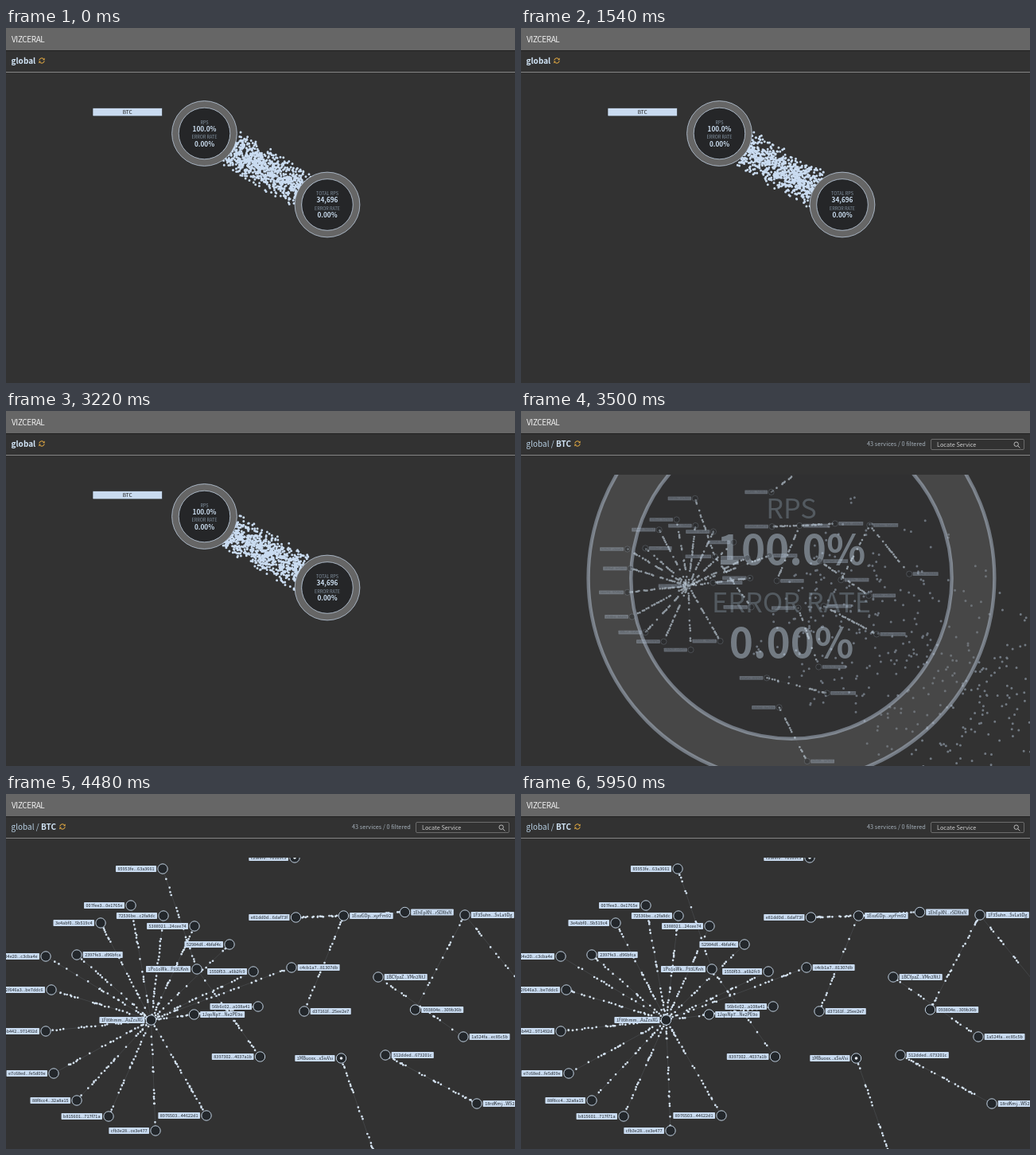
An HTML page with a canvas for the animation above (6020 ms loop, 640 by 446 pixels).

```html
<!DOCTYPE html>
<html lang="en">
<head>
<meta charset="utf-8">
<title>Traffic graph</title>
<style>
  html, body { margin: 0; width: 640px; height: 446px; overflow: hidden; background: #323232; }
  body {
    position: relative;
    font-family: "Noto Sans CJK JP", "Noto Sans CJK SC", "Noto Sans CJK", "Open Sans", sans-serif;
  }
  canvas { position: absolute; left: 0; top: 0; width: 640px; height: 446px; }
  header {
    position: absolute; left: 0; top: 0; width: 633px; height: 28px; padding-left: 7px;
    background: #666; border-bottom: 1px solid #1f1f1f;
    font-size: 10px; font-weight: 300; line-height: 27px; letter-spacing: -.4px; color: #f2f2f2;
  }
  nav {
    position: absolute; left: 0; top: 29px; width: 640px; height: 26px;
    border-bottom: 1px solid #858585; white-space: pre;
  }
  .crumb {
    position: absolute; left: 6.5px; top: -1px; height: 25px;
    display: flex; align-items: center; font-size: 10px; line-height: 24px; color: #b7cfe3;
  }
  .crumb b { color: #d3e6f8; }
  .crumb svg { margin: 1px 0 0 4px; }
  .count, .search { position: absolute; font-size: 7.35px; }
  .count { left: 435px; top: 6px; line-height: 12px; color: #a5b0ba; }
  .search {
    left: 515px; top: 6px; width: 109px; height: 12px; padding-left: 7px; line-height: 11px;
    border: 1px solid #6c6c6c; border-radius: 2px; color: #ccc;
  }
  .search svg { position: absolute; right: 4.5px; top: 1.5px; }
  .inside .top, .outside .deep { display: none; }
</style>
</head>
<body class="outside">
<canvas id="scene"></canvas>
<header>VIZCERAL</header>
<nav>
  <div class="crumb"><b class="top">global</b><span class="deep">global / <b>BTC</b></span><svg
    width="8" height="8" viewBox="0 0 8 8" fill="none" stroke="#efb243" stroke-width="1">
    <path d="M.8 3.6A3.2 3.2 0 0 1 6.6 2.2M7.2 4.4A3.2 3.2 0 0 1 1.4 5.8"/>
    <path d="M7.6.6V3.2H5ZM.4 7.4V4.8H3Z" fill="#efb243" stroke="none"/></svg></div>
  <span class="count deep">43 services / 0 filtered</span>
  <div class="search deep">Locate Service<svg width="9" height="9" viewBox="0 0 9 9"
    fill="none" stroke="#bbb" stroke-width="1"><circle cx="3.7" cy="3.7" r="2.7"/><path d="M5.7 5.7 8.4 8.4"/></svg></div>
</nav>
<script>
const LOOP = 6020, STEP = 70, ZOOM_AT = 3250, ZOOM_TIME = 1000;
const BLUE = '#c9dbf0', TAU = Math.PI * 2;
const FONT = getComputedStyle(document.body).fontFamily;
const canvas = document.getElementById('scene');
const ctx = canvas.getContext('2d');
const dpr = window.devicePixelRatio || 1;
canvas.width = 640 * dpr;
canvas.height = 446 * dpr;

let seed = 7;
function rnd() {
  seed = (seed + 0x6D2B79F5) | 0;
  let r = Math.imul(seed ^ (seed >>> 15), 1 | seed);
  r = (r + Math.imul(r ^ (r >>> 7), 61 | r)) ^ r;
  return ((r ^ (r >>> 14)) >>> 0) / 4294967296;
}
const mix = (a, b, k) => a + (b - a) * k;

// Outer view: one region fed by the total
const region = { x: 249.5, y: 132.5, title: 'RPS', value: '100.0%' };
const total = { x: 404, y: 222, title: 'TOTAL RPS', value: '34,696' };
const stream = Array.from({ length: 1350 }, () => ({
  phase: rnd(), speed: 0.25 + rnd() * 0.3, side: (rnd() + rnd() - 1) * 26
}));

// Inner view: x, y, label, label on the left, lit core
const nodes = [
  [182.5, 284, '1F89hmm...AsZcvXG', 1], [197, 94, '85953fe...63a3661', 1],
  [157, 140, '007fee3...0e1765e', 1], [198, 153, '72536be...c2fa8dc', 1],
  [119, 162, '3e4abf0...5b519c4', 1], [237, 166, '5388921...24cee74', 1],
  [281, 189, '52984df...4bfaf4c', 1], [89, 202, '2397fe3...d96bfca', 0],
  [50, 204, '4c94e20...c3cba4e', 1], [57, 246, '2f646a3...be7ddc6', 1],
  [50, 298, '2dbb442...971492d', 1], [60, 351, 'e7c68ed...fe5d09e', 1],
  [89, 385, '88f8cc4...32a8a15', 1], [129, 405, 'b815601...717f71a', 1],
  [188, 423, 'cfb3e28...ce3e477', 1], [252, 404, '8976503...44622d1', 1],
  [319.5, 330, '8397302...4037a1b', 1], [236.5, 277, '1JqoNp7...Ne2PE9o', 0],
  [317, 267, '56b6c02...a108a41', 1], [311, 223, '1550f53...a6b2fc9', 1],
  [240, 220, '1Po1oWk...F93LKnh', 1], [359, 218, 'c4cb1a7...81307db', 0],
  [375, 273, 'd37161f...25ee2e7', 0], [364.5, 155, 'e81dd0d...6daf73f', 1],
  [424.5, 153, '1EozGDp...xyrFm92', 0], [501.5, 148.5, '1EhEpXN...rSDXfxN', 0],
  [577, 152, '1F3Suhn...SvLa9Dg', 0], [468, 230, '1BCYpzZ...VMn2NfJ', 0],
  [514.5, 271, '093804e...309b36b', 0], [575, 305, '1a524fa...ec85c5b', 0],
  [477, 328, '512dded...673201c', 0], [592, 389, '18rdKmj...WS2MHxt', 0],
  [421.5, 332, '1MBuoxx...xSivVsi', 1, 1], [363, 80, 'c2af8f0...7d105c3', 1, 1],
  [466, 460, '4e02b7d...92c1f6a', 0], [430, 30, 'a71c3e9...05d84bb', 0],
  [663, 258, '1Kt7fQw...mZ8hRcE', 0], [353, 484, 'd90a41c...f6327e8', 1, 1],
  [484, 517, '1Gn4xPu...bW6yLsT', 0], [380, 548, '63fb0d2...8ac719e', 1, 1],
  [441, 665, 'b25e8f4...1d70c93', 0]
].map(([x, y, label, left, core]) => ({ x, y, label, left, core }));

const spokes = [2, 3, 4, 5, 6, 7, 8, 9, 10, 11, 12, 13, 14, 15, 18, 19, 21].map(i => [i, 0]);
const links = [[1, 20], [20, 16], [23, 24], [25, 24], [24, 22], [26, 28], [27, 29],
  [30, 31], [32, 34], [33, 35], [26, 36], [37, 38], [39, 40]];

// Dots leave in short bursts at a steady average rate
function makeEdge([from, to], bursts) {
  const dots = [];
  for (let i = 0; i < bursts; i++) {
    const birth = 0.2 + 5.8 * (i + rnd()) / bursts;
    const size = 1 + Math.floor(rnd() * 3.4);
    for (let k = 0; k < size; k++) {
      dots.push({ birth: birth + k * (0.05 + rnd() * 0.05), side: (rnd() - 0.5) * 1.2 });
    }
  }
  return { a: nodes[from], b: nodes[to], dots };
}
const edges = [...spokes.map(e => makeEdge(e, 24)), ...links.map(e => makeEdge(e, 20))];

function disc(x, y, r, fill) {
  ctx.beginPath();
  ctx.arc(x, y, r, 0, TAU);
  ctx.fillStyle = fill;
  ctx.fill();
}

function text(str, x, y, size, color, weight = 400) {
  ctx.font = `${weight} ${size}px ${FONT}`;
  ctx.fillStyle = color;
  ctx.fillText(str, x, y + size * 0.366);
}

// Dots keep their size while the view scales
function dotsAlong(a, b, dots, place, r, view) {
  const dx = b.x - a.x, dy = b.y - a.y, len = Math.hypot(dx, dy);
  ctx.beginPath();
  for (const d of dots) {
    const u = place(d);
    if (u < 0 || u > 1) continue;
    const x = view.x + view.s * (a.x + dx * u - dy / len * d.side);
    const y = view.y + view.s * (a.y + dy * u + dx / len * d.side);
    ctx.moveTo(x + r, y);
    ctx.arc(x, y, r, 0, TAU);
  }
  ctx.fill();
}

function inView(view, draw) {
  ctx.save();
  ctx.translate(view.x, view.y);
  ctx.scale(view.s, view.s);
  draw();
  ctx.restore();
}

function drawHub({ x, y, title, value }) {
  const outer = 40.9, inner = 32.3, alpha = ctx.globalAlpha;
  ctx.globalAlpha = alpha ** 3; // the core clears ahead of its ring
  disc(x, y, inner, '#252628');
  ctx.globalAlpha = alpha;
  ctx.beginPath();
  ctx.arc(x, y, outer, 0, TAU);
  ctx.arc(x, y, inner, 0, TAU, true);
  ctx.fillStyle = '#666';
  ctx.fill('evenodd');
  ctx.strokeStyle = '#cddff2';
  ctx.lineWidth = 0.7;
  for (const r of [outer, inner]) {
    ctx.beginPath();
    ctx.arc(x, y, r, 0, TAU);
    ctx.stroke();
  }
  text(title, x, y - 14, 5.5, '#8494a3', 500);
  text(value, x, y - 5.8, 8.2, '#d0e3f6', 900);
  text('ERROR RATE', x, y + 4.8, 5.5, '#8494a3', 500);
  text('0.00%', x, y + 13, 8.2, '#d0e3f6', 900);
}

function drawOuter(sec, view) {
  ctx.fillStyle = BLUE;
  dotsAlong(total, region, stream, d => (d.phase + d.speed * sec) % 1, 1.5, view);
  inView(view, () => {
    ctx.fillStyle = BLUE;
    ctx.strokeStyle = '#222';
    ctx.lineWidth = 0.6;
    ctx.beginPath();
    ctx.roundRect(109, 100.5, 87.5, 10.3, 1);
    ctx.fill();
    ctx.stroke();
    text('BTC', 152.7, 105.8, 6.5, '#222');
    drawHub(region);
    drawHub(total);
  });
}

function drawNode(n) {
  disc(n.x, n.y, 6.2, '#23272b');
  ctx.strokeStyle = '#c3d3e3';
  ctx.lineWidth = 1;
  ctx.stroke();
  if (n.core) disc(n.x, n.y, 1.8, '#eef4fa');
}

function drawLabel(n) {
  ctx.font = `400 5.5px ${FONT}`;
  const w = ctx.measureText(n.label).width + 5;
  const x = n.left ? n.x - 8 - w : n.x + 7.7;
  ctx.fillStyle = BLUE;
  ctx.beginPath();
  ctx.roundRect(x, n.y - 4.1, w, 8.2, 0.8);
  ctx.fill();
  text(n.label, x + w / 2, n.y, 5.5, '#20262c');
}

function drawInner(sec, view) {
  inView(view, () => {
    ctx.strokeStyle = 'rgba(200, 215, 230, .16)';
    ctx.lineWidth = 0.7;
    ctx.beginPath();
    for (const { a, b } of edges) {
      ctx.moveTo(a.x, a.y);
      ctx.lineTo(b.x, b.y);
    }
    ctx.stroke();
  });
  ctx.fillStyle = '#d3e1ef';
  for (const { a, b, dots } of edges) {
    dotsAlong(a, b, dots, d => (sec - d.birth) * 0.4, 1.35, view);
  }
  ctx.globalAlpha **= 2; // nodes and labels come in behind the traffic
  inView(view, () => {
    nodes.forEach(drawNode);
    nodes.forEach(drawLabel);
  });
}

function render(ms) {
  const sec = ms / 1000;
  const u = Math.min(1, Math.max(0, (ms - ZOOM_AT) / ZOOM_TIME));
  const k = 1 - Math.pow(1 - u, 3);
  document.body.className = ms >= ZOOM_AT ? 'inside' : 'outside';

  ctx.setTransform(dpr, 0, 0, dpr, 0, 0);
  ctx.clearRect(0, 0, 640, 446);
  ctx.save();
  ctx.beginPath();
  ctx.rect(0, 80, 640, 366);
  ctx.clip();
  ctx.textAlign = 'center';

  if (k < 1) {
    const s = mix(1, 10.07, k);
    ctx.globalAlpha = 1 - k;
    drawOuter(sec, {
      s,
      x: mix(region.x, 406, k) - region.x * s,
      y: mix(region.y, 266.6, k) - region.y * s
    });
  }
  if (k > 0) {
    ctx.globalAlpha = k;
    drawInner(sec, { s: k, x: 248.6 * (1 - k), y: 131.7 * (1 - k) });
  }
  ctx.restore();
}

const start = performance.now();
function tick() {
  const ms = (performance.now() - start) % LOOP;
  render(Math.floor(ms / STEP) * STEP);
  requestAnimationFrame(tick);
}
tick();
</script>
</body>
</html>
```
